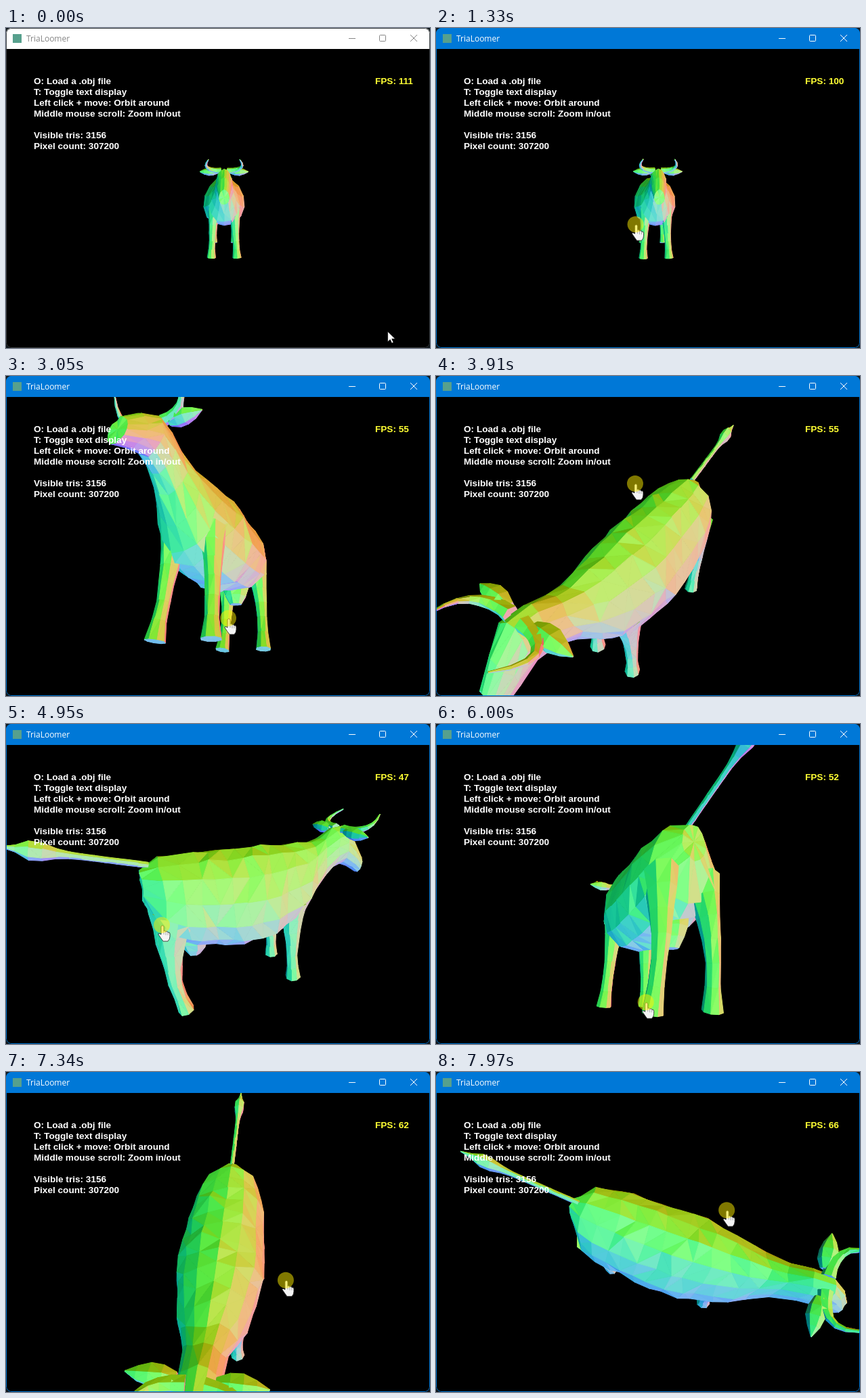
Recreate the animation shown at these times as an HTML page with a canvas. Size 626 px wide and 473 px high, loop 8000 ms.

```html
<!DOCTYPE html>
<html lang="en">
<head>
<meta charset="utf-8">
<title>Model viewer</title>
<style>
  html, body { margin: 0; width: 100%; height: 100%; overflow: hidden; background: #10181d; }
  #window { position: absolute; inset: 0; width: 626px; height: 473px; border-radius: 8px; overflow: hidden; background: #000; --bar: #fff; --ink: #858585; --edge: #3a3f42; }
  #window.active { --bar: #0078d7; --ink: #fff; --edge: #0078d7; }
  #window > * { position: absolute; }
  #bar { inset: 0 0 auto; height: 31px; background: var(--bar); color: var(--ink); font: 12px/31px "Open Sans", sans-serif; }
  #bar b { position: absolute; left: 10px; top: 9px; width: 13px; height: 13px; background: #57a08d; }
  #bar span { position: absolute; left: 30px; }
  #bar svg { position: absolute; left: 500px; top: 0; fill: none; stroke: var(--ink); }
  #edge { inset: 0; border: 1px solid var(--edge); border-radius: 8px; }
  pre { margin: 0; top: 71px; color: #fff; font: bold 13.6px/16px "Liberation Sans", Arial, sans-serif; }
  #help { left: 41px; }
  #fps { left: 545px; color: #ff3; }
  #pointer { left: 0; top: 0; overflow: visible; }
  #window.active #arrow, #window:not(.active) #press { display: none; }
</style>
</head>
<body>
<div id="window">
  <canvas id="view" width="626" height="473"></canvas>
  <pre id="help">O: Load a .obj file
T: Toggle text display
Left click + move: Orbit around
Middle mouse scroll: Zoom in/out

Visible tris: 3156
Pixel count: 307200</pre>
  <pre id="fps"></pre>
  <div id="bar"><b></b><span>TriaLoomer</span>
    <svg width="120" height="30"><path d="M6 15.5H16M97 10l10 10m0-10L97 20"/><rect x="51.5" y="10.5" width="9" height="9" rx="1"/></svg>
  </div>
  <div id="edge"></div>
  <svg id="pointer" width="1" height="1">
    <path id="arrow" d="M0 0V15L3.6 11.7 6 17 8.4 16 6 10.8H11Z" fill="#fff" stroke="#000" stroke-width=".6"/>
    <g id="press">
      <path d="M-1 2Q1-1 3 2V9Q5 7 6 10 8 8 9 11 12 10 12 13V17Q12 21 9 24H2Q-1 20-5 14-5 11-1 14Z" fill="#f4f4f4" stroke="#222" stroke-width=".8"/>
      <path d="M3 8V14M6 10V15M9 11V15" stroke="#888" stroke-width=".7"/>
      <circle r="12" fill="#fff000" fill-opacity=".5"/>
    </g>
  </svg>
</div>
<script>
const LOOP = 8000, CLICK = 740, FOCAL = 400, CENTER = [322, 252];
const $ = id => document.getElementById(id);
const ctx = $('view').getContext('2d');

// Vectors
const sub = (a, b) => a.map((v, i) => v - b[i]);
const dot = (a, b) => a[0] * b[0] + a[1] * b[1] + a[2] * b[2];
const cross = (a, b) => [a[1] * b[2] - a[2] * b[1], a[2] * b[0] - a[0] * b[2], a[0] * b[1] - a[1] * b[0]];
const unit = a => { const l = Math.hypot(...a) || 1; return a.map(v => v / l); };
const mix = (a, b, u) => a + (b - a) * u;

let seed = 11;
const random = () => (seed = seed * 16807 % 2147483647) / 2147483647;
const jitter = size => (random() - .5) * size;

// Monotone cubic through rows of [position, value, ...]
function sample(rows, t) {
  const last = rows.length - 1;
  let i = 0;
  while (i < last - 1 && t >= rows[i + 1][0]) i++;
  const a = rows[i], b = rows[i + 1], h = b[0] - a[0], u = Math.min(1, (t - a[0]) / h);
  const slope = (k, c) => (rows[k + 1][c] - rows[k][c]) / (rows[k + 1][0] - rows[k][0]);
  const tangent = (k, c) => {
    if (!k || k === last) return slope(k ? k - 1 : 0, c);
    const p = slope(k - 1, c), q = slope(k, c);
    return p * q > 0 ? 2 * p * q / (p + q) : 0;
  };
  return a.slice(1).map((v, j) => {
    const c = j + 1;
    return mix(v, b[c], u * u * (3 - 2 * u)) + h * u * (1 - u) * ((1 - u) * tangent(i, c) - u * tangent(i + 1, c));
  });
}

// The cow looks along +x, y is up
const faces = [];

function addFace(a, b, c, core) {
  let normal = cross(sub(b, a), sub(c, a));
  if (Math.hypot(...normal) < 1e-6) return;
  normal = unit(normal);
  const middle = a.map((v, i) => (v + b[i] + c[i]) / 3);
  if (dot(normal, sub(middle, core)) < 0) normal = normal.map(v => -v);
  faces.push({ points: [a, b, c], normal });
}

// stopAt(u) gives x, y, z, radius along "up", radius along "side"; without ref the rings stand upright
function tube(stopAt, steps, sides, ref) {
  const stops = Array.from({ length: steps + 1 }, (_, i) => stopAt(i / steps));
  const rings = stops.map(([x, y, z, r, w = r], i) => {
    let side = [0, 0, 1], up = [0, 1, 0];
    if (ref) {
      const next = stops[Math.min(i + 1, steps)], prev = stops[Math.max(i - 1, 0)];
      side = unit(cross(unit(sub(next.slice(0, 3), prev.slice(0, 3))), ref));
      up = cross(side, unit(sub(next.slice(0, 3), prev.slice(0, 3))));
    }
    return Array.from({ length: sides }, (_, k) => {
      const a = k / sides * 2 * Math.PI, bulge = 1 + jitter(.09);
      const u = Math.cos(a) * r * bulge, s = Math.sin(a) * w * bulge * (ref ? 1 : 1 - .13 * Math.cos(a));
      return [x + jitter(.18 * r), y, z].map((v, j) => v + up[j] * u + side[j] * s);
    });
  });
  const cap = stop => Array(sides).fill(stop.slice(0, 3));
  const all = [cap(stops[0]), ...rings, cap(stops[steps])];
  for (let i = 0; i + 1 < all.length; i++) {
    // An inner point tells which way each face looks
    const p = stops[Math.min(Math.max(i - 1, 0), steps - 1)], q = stops[Math.max(Math.min(i, steps), 1)];
    const core = [0, 1, 2].map(j => mix(p[j], q[j], .5));
    for (let k = 0; k < sides; k++) {
      const n = (k + 1) % sides;
      const a = all[i][k], b = all[i][n], c = all[i + 1][n], d = all[i + 1][k];
      if (random() < .5) { addFace(a, b, c, core); addFace(a, c, d, core); }
      else { addFace(a, b, d, core); addFace(b, c, d, core); }
    }
  }
}

function buildCow() {
  const X = [1, 0, 0], Y = [0, 1, 0];

  // Trunk and head: x, middle height, half height, half width
  const trunk = [
    [-2.75, .7, .6, .4], [-2, .2, 1.45, 1.25], [.8, -.15, 1.78, 1.47], [2.8, .05, 1.55, 1.08],
    [4.2, 1, .8, .52], [4.9, 1.4, .75, .48], [6.1, .5, .4, .28]
  ];
  tube(u => {
    const x = mix(-2.75, 6.1, u), [y, r, w] = sample(trunk, x);
    return [x, y, 0, r, w];
  }, 17, 14);

  const leg = (hip, hipY, hoof, bend, thick, z) => tube(u => {
    const r = .19 + thick * (1 - u) ** 2.5 + .1 * u ** 8;
    return [mix(hip, hoof, u) + bend * Math.sin(Math.PI * u), mix(hipY, -3.9, u), z * mix(.8, 1, u), r, r * mix(.7, 1, u)];
  }, 6, 8, X);

  for (const s of [1, -1]) {
    leg(2.5, -.5, 2.8, -.05, .42, .88 * s);
    leg(-1.9, -.1, -1.85, -.3, .55, .9 * s);
    // Horn, then ear
    tube(u => [4.85 + .9 * u * u, 2 + .6 * u * u, s * (.2 + .85 * Math.sin(2.2 * u)), .16 * (1 - u) + .01], 7, 6, Y);
    tube(u => [4.75, 1.95, s * (.4 + 1.05 * u), .22 * Math.sin(Math.PI * mix(.15, 1, u)) + .01], 4, 6, Y);
  }
  // Udder, then tail with its tuft
  tube(u => [-1.2, mix(-1.2, -2.15, u), 0, .6 - .35 * u * u], 3, 8, X);
  tube(u => {
    const r = (.09 + .18 * Math.exp(-(((u - .8) / .12) ** 2))) * Math.min(1, 6 * (1 - u) + .05);
    return [-2.5 - 3.5 * u, 1.4 + .9 * u, 0, r, .75 * r];
  }, 12, 6, Y);
}

// time, yaw, pitch, distance
const camera = [
  [0, 0, 4, 21.2], [1700, 3, 4, 21], [2400, -3, 2, 11.7], [3050, -24, -24, 11.2], [3910, -34, 45, 9.6],
  [4950, -248, 24, 9.7], [5900, -165, -22, 10], [6800, -70, 35, 9.8], [8000, 73, 75, 9.5]
];
// time, x, y
const mouse = [
  [0, 564, 449], [720, 298, 291], [1700, 294, 290], [3050, 328, 358], [3910, 294, 159],
  [4950, 230, 297], [5900, 300, 412], [6800, 394, 373], [8000, 430, 200]
];
const rate = [[0, 111], [1330, 100], [3040, 55], [3800, 55], [4940, 47], [6650, 58], [7790, 66]];

function drawCow(t) {
  const [yaw, pitch, distance] = sample(camera, t);
  const rad = Math.PI / 180;
  const sy = Math.sin(yaw * rad), cy = Math.cos(yaw * rad), sp = Math.sin(pitch * rad), cp = Math.cos(pitch * rad);
  const turn = ([x, y, z]) => {
    const across = x * sy - z * cy, away = -x * cy - z * sy;
    return [across, y * cp + away * sp, away * cp - y * sp];
  };
  const visible = [];
  for (const { points, normal } of faces) {
    const n = turn(normal);
    const p = points.map(v => { const q = turn(v); q[2] += distance; return q; });
    if (dot(n, p[0]) < 0) visible.push({ n, p, depth: p[0][2] + p[1][2] + p[2][2] });
  }
  visible.sort((a, b) => b.depth - a.depth);
  ctx.clearRect(0, 0, 626, 473);
  ctx.lineJoin = 'round';
  // Each face is coloured by the direction it faces on screen
  const tone = v => Math.round(127.5 + 127.5 * v);
  for (const { n, p } of visible) {
    ctx.fillStyle = ctx.strokeStyle = `rgb(${tone(n[0])},${tone(-n[2])},${tone(-n[1])})`;
    ctx.beginPath();
    for (const [x, y, z] of p) ctx.lineTo(CENTER[0] + FOCAL * x / z, CENTER[1] - FOCAL * y / z);
    ctx.closePath();
    ctx.fill();
    ctx.stroke();
  }
}

function draw() {
  const t = performance.now() % LOOP;
  drawCow(t);
  $('window').classList.toggle('active', t >= CLICK);
  const [x, y] = sample(mouse, t);
  $('pointer').style.transform = `translate(${x}px, ${y}px)`;
  $('fps').textContent = 'FPS: ' + Math.round(sample(rate, t - t % 190)[0]);
  requestAnimationFrame(draw);
}

buildCow();
draw();
</script>
</body>
</html>
```
